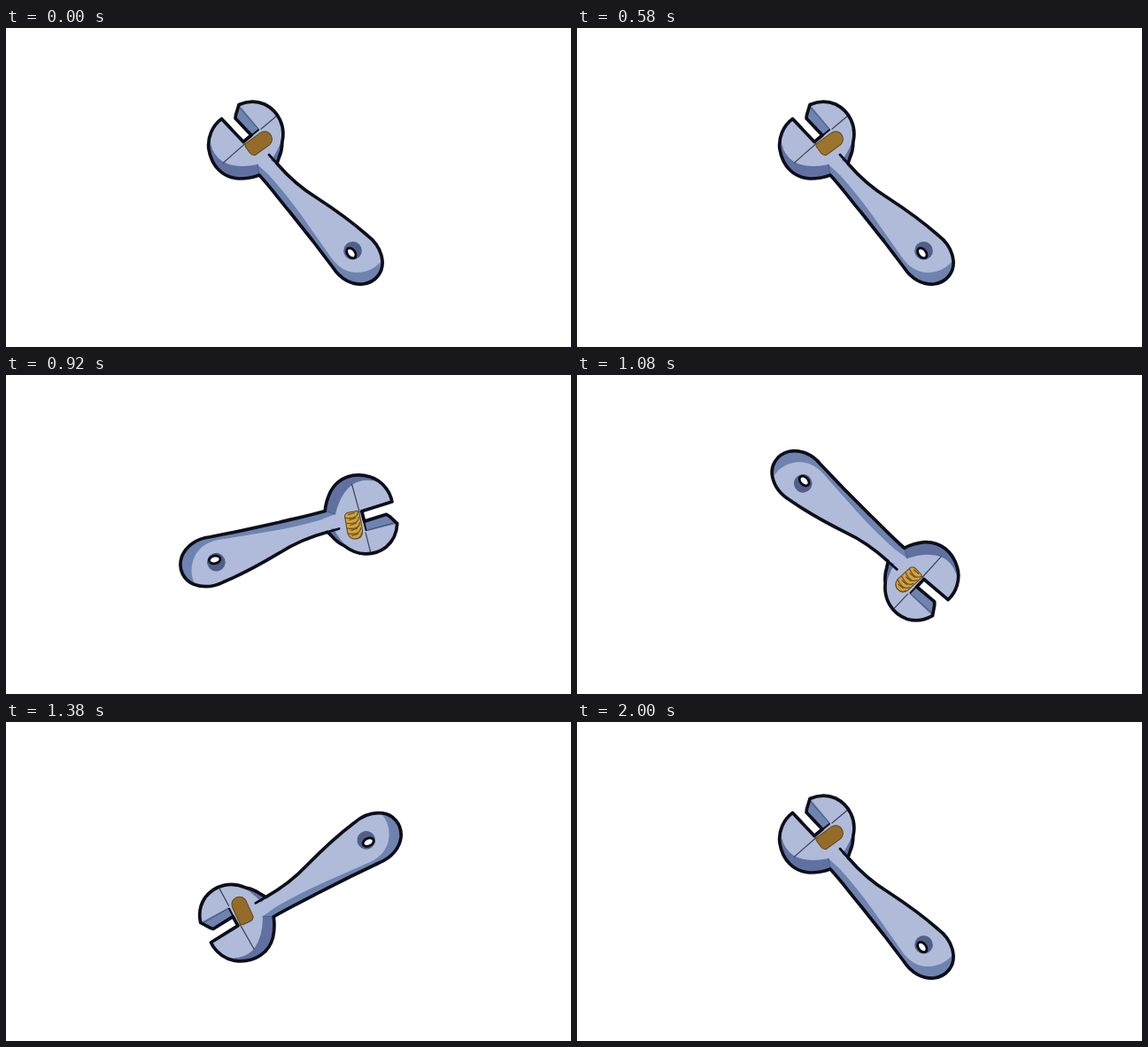
Animation, 638 px wide and 360 px high, one loop 2020 ms. Source, as an HTML page:

```html
<!DOCTYPE html>
<html lang="en">
<head>
<meta charset="utf-8">
<title>Turning wrench</title>
<style>
  html, body { margin: 0; width: 100%; height: 100%; overflow: hidden; background: #fff; }
  svg { display: block; width: 638px; height: 360px; }
</style>
</head>
<body>
<svg viewBox="0 0 638 360">
  <defs>
    <path id="body" d="M243.5 102.5 C233 110 227 124 229 137 C232 156 245 169 263 170
      Q276 170 286 166 C299 180 309 194 320 207 L347 241 L369 270
      C378 284 391 290 403 289 C418 287 426 275 425 263 C424 251 417 241 408 234
      C391 219 370 204 350 191 C332 180 319 168 306 153 L308 147 Q312 138 311.800 129
      C316 111 308 94 292 86 Q278 80 263 86.5 L259.5 98 L259 102
      L277 121 L268 128.500 Z"/>
    <clipPath id="inside"><use href="#body"/></clipPath>
    <clipPath id="pill"><path id="screwShape" d="M-14 -8.500 H8 Q15.500 -7 15.500 0 Q15 7 8 8.500 H-12 Q-15.500 7 -15.500 3 V-6 Z"/></clipPath>
  </defs>
  <g id="wrench" stroke-linejoin="round" stroke-linecap="round">
    <use href="#body" fill="#6e83b0"/>
    <g clip-path="url(#inside)">
      <path d="M220 128 L284 154 L286 172 H220 Z M299 152 L318 115 V152 Z" fill="#6071a1"/>
      <path d="M243 101 C233 110 229 120 231 130 Q234 144 245 151 Q260 159 284 154
        L297 166 Q316 187 334 212 L365 256 Q377 275 395 276 Q415 276 426 260
        L410 230 L350 187 L299 149 Q309 137 314 117 L305 90 L278 79 L262 85
        L286 114 L268 129 Z" fill="#afbbd9"/>
      <path d="M284 154 L286 166" stroke="#4c5c88"/>
    </g>
    <g fill="none" stroke="#0d0e18">
      <path d="M245.500 152 L270 130.500 M288 114 L307 98" stroke="#3b4255" stroke-width="1.200"/>
      <path d="M262 88 L285 114" stroke="#39445f" stroke-width=".8"/>
      <path d="M268 129 L285 115" stroke-width="2"/>
      <path d="M297 143 L306 153" stroke-width="2.800"/>
      <use href="#body" stroke-width="3.700"/>
    </g>
    <ellipse cx="391.500" cy="251.300" rx="10.300" ry="10.300" fill="#505e8a"/>
    <ellipse cx="389.800" cy="254" rx="4.300" ry="6.400" transform="rotate(-38 389.800 254)"
      fill="#fff" stroke="#0a0c14" stroke-width="2.800"/>
    <g transform="translate(286.300 129.500) rotate(-36)">
      <use id="screw" href="#screwShape" stroke="#594421" stroke-width="1"/>
      <g id="coils" clip-path="url(#pill)" fill="none" stroke="#6e501c" stroke-width="1.200"></g>
    </g>
  </g>
</svg>
<script>
  const LOOP = 2020, STEP = 20, SPIN_START = 598, SPIN_TIME = 1000;
  const find = id => document.getElementById(id);
  const ramp = (t, from, to) => Math.min(1, Math.max(0, (t - from) / (to - from)));
  const mix = (a, b, k) => `rgb(${a.map((v, i) => Math.round(v + (b[i] - v) * k))})`;
  const BROWN = [148, 108, 40], GOLD = [208, 161, 68];

  find("coils").innerHTML = [-11, -5, 1, 7, 13].map(x =>
    `<path d="M${x - 3} -7 Q${x + 5} -5 ${x + 1} 8 M${x - 3} -3 L${x - 2} 4"/>`).join("");

  function draw(now) {
    const t = Math.floor(now % LOOP / STEP) * STEP;
    const angle = 360 * ramp(t, SPIN_START, SPIN_START + SPIN_TIME);
    // The worm screw lights up and shows its thread during the first half of the turn.
    const off = 1 - ramp(t, 1200, 1380);
    const glow = Math.min(.15 * ramp(t, 160, 580) + .85 * ramp(t, 580, 700), off);
    find("wrench").setAttribute("transform", `rotate(${angle} 327 183)`);
    find("screw").setAttribute("fill", mix(BROWN, GOLD, glow));
    find("coils").setAttribute("opacity", Math.min(ramp(t, 580, 700), off));
  }

  let start;
  function tick(now) {
    start ??= now;
    draw(now - start);
    requestAnimationFrame(tick);
  }
  draw(0);
  requestAnimationFrame(tick);
</script>
</body>
</html>
```
